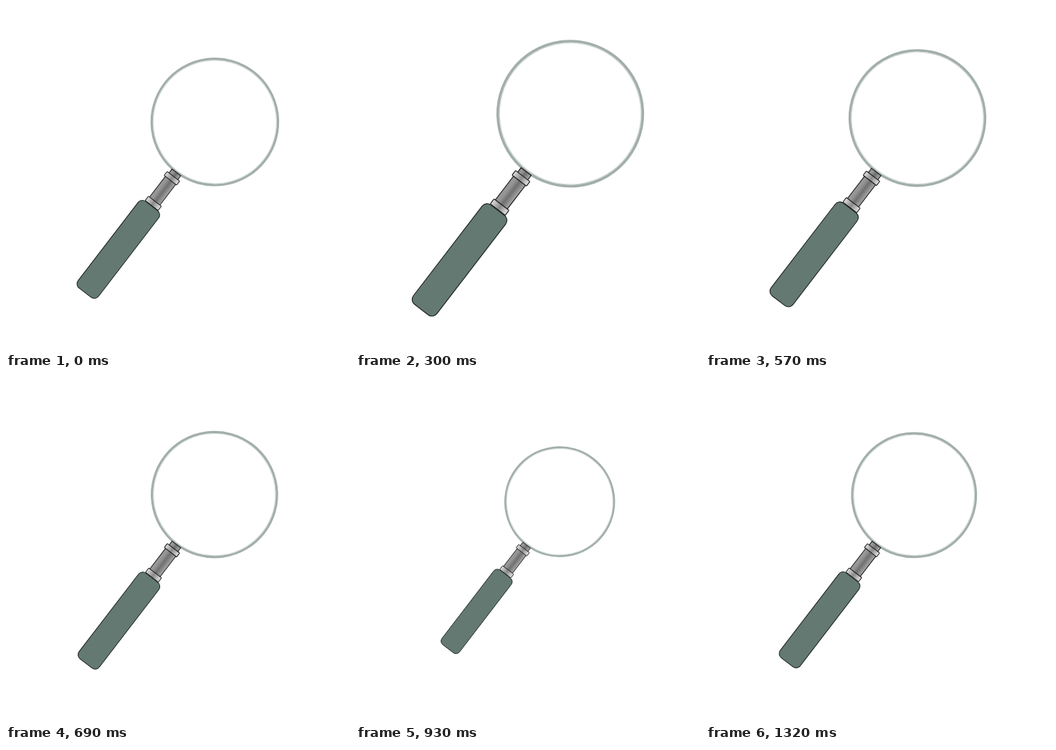
An HTML page that plays this animation: 480 px wide and 480 px high, repeating every 1350 ms.

```html
<!DOCTYPE html>
<html lang="en">
<head>
<meta charset="utf-8">
<title>Magnifying glass</title>
<style>
  @property --turn {
    syntax: "<number>";
    inherits: true;
    initial-value: 0;
  }
  html, body {
    margin: 0;
    width: 100%;
    height: 100%;
    overflow: hidden;
    background: #fff;
  }
  svg { display: block; width: 100%; height: 100%; }

  /* sine pulse, advancing every 30 ms */
  .glass {
    transform-origin: 240px 240px;
    transform: scale(calc(1 + 0.15 * sin(var(--turn) * 360deg)));
    animation: pulse 1350ms steps(45, end) infinite;
  }
  @keyframes pulse {
    from { --turn: 0; }
    to { --turn: 1; }
  }
  .metal { stroke: #161616; stroke-width: 1; }
  .grip { fill: #637971; stroke: #1a1f1d; stroke-width: 1; }
  .rim { fill: none; stroke: #a2aeaa; stroke-width: 3.2; }
  .shine { fill: none; stroke: #d6dedb; stroke-width: 1.2; }
</style>
</head>
<body>
<svg viewBox="0 0 480 480">
  <defs>
    <linearGradient id="stem">
      <stop offset="0" stop-color="#9a9a9a"/>
      <stop offset=".25" stop-color="#949494"/>
      <stop offset=".55" stop-color="#707070"/>
      <stop offset="1" stop-color="#a8a8a8"/>
    </linearGradient>
    <linearGradient id="collar">
      <stop offset="0" stop-color="#dedede"/>
      <stop offset=".5" stop-color="#8a8a8a"/>
      <stop offset="1" stop-color="#e2e2e2"/>
    </linearGradient>
  </defs>
  <g class="glass">
    <g transform="translate(291.4 161.8) rotate(37.5)">
      <circle class="shine" r="86"/>
      <circle class="rim" r="88.2"/>
      <rect class="metal" fill="url(#stem)" x="-7.5" y="88.5" width="15.5" height="8"/>
      <rect class="metal" fill="url(#stem)" x="-8.5" y="101" width="18.3" height="39"/>
      <rect class="metal" fill="url(#collar)" x="-10.7" y="95.3" width="22" height="7" rx=".8"/>
      <rect class="metal" fill="url(#collar)" x="-10.4" y="138.6" width="22.8" height="7.6" rx=".8"/>
      <rect class="grip" x="-16.6" y="146.8" width="36" height="152.4" rx="7.5"/>
    </g>
  </g>
</svg>
</body>
</html>
```
